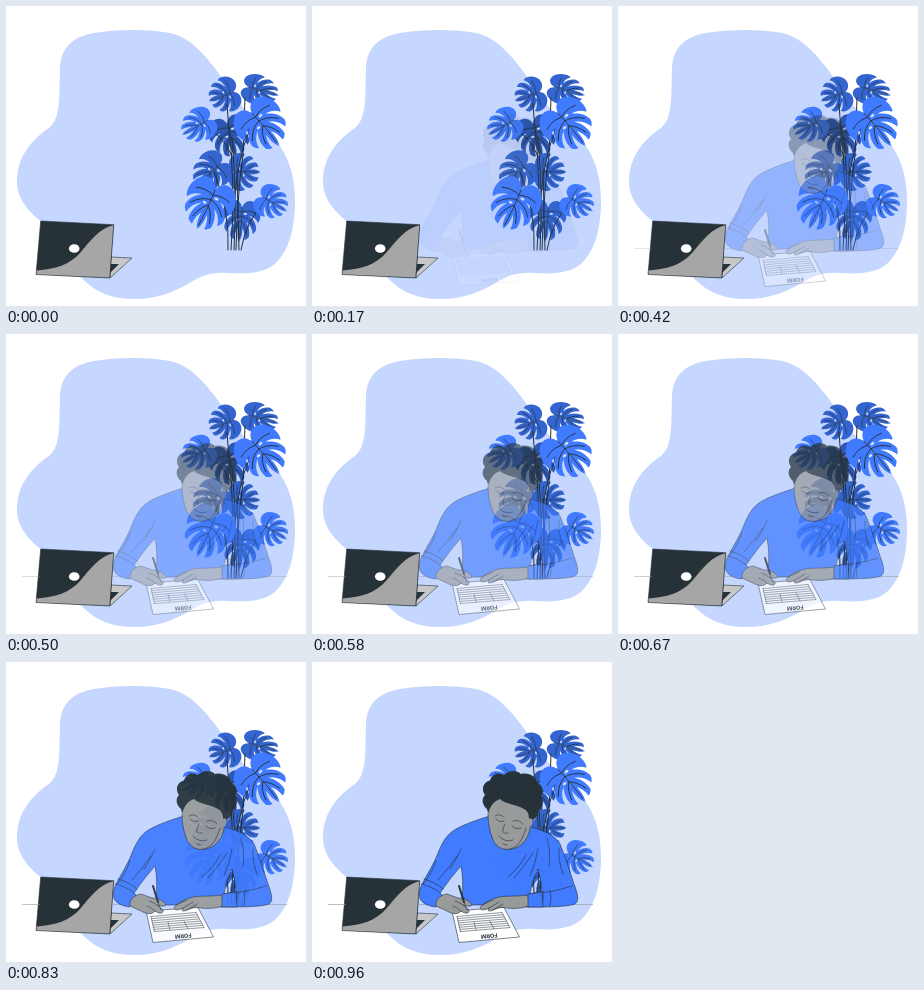
Recreate the animation shown at these times as an HTML page. Size 300 px wide and 300 px high, loop 1000 ms.

```html
<!DOCTYPE html>
<html lang="en">
<head>
<meta charset="utf-8">
<title>Filling in a form</title>
<style>
html, body { margin: 0; width: 100%; height: 100%; overflow: hidden; background: #fff; }
svg { display: block; width: 100vw; height: 100vh; }
.ink { fill: none; stroke: #263238; stroke-width: .6; stroke-linecap: round; stroke-linejoin: round; }
.edge { stroke: #263238; stroke-width: .6; stroke-linejoin: round; }
.skin { fill: #999b9b; }
.shirt { fill: #407bff; }
text { font: 700 5.6px Inter, Arial, sans-serif; fill: #263238; text-anchor: middle; }
</style>
</head>
<body>
<svg viewBox="0 0 300 300">
  <defs>
    <path id="half" d="M0-.55C.05-.85.35-1.05.65-.88C.9-.72 1.02-.4 1-.12C.99 0 .96.06.91.13C.82-.06.62-.18.4-.2C.64-.05.84.18.84.46C.82.57.76.64.68.7C.64.44.5.24.28.12C.46.36.53.6.49.88C.43.97.34 1.02.27 1.03C.28.8.22.6.12.46C.14.72.12.95 0 1.15Z"/>
    <path id="veins" fill="none" stroke="#263238" stroke-width=".035" d="M0-.6Q.05.2 0 1M0-.35Q.35-.5.75-.35M0-.35Q-.35-.5-.75-.35M0-.15Q.4-.1.7.3M0-.15Q-.4-.1-.7.3M0 .1Q.25.3.37.75M0 .1Q-.25.3-.37.75"/>
  </defs>

  <path fill="#c5d6ff" d="M54 62C55 42 66 31 88 27C112 23 143 23 164 27C183 31 197 46 214 69C226 94 245 108 262 126C281 144 289 167 289 194C289 220 284 243 270 257C258 268 240 268 222 267C204 266 196 270 185 276C167 287 149 293 129 293C105 293 88 286 74 270C63 257 52 233 36 216C20 204 10 190 11 173C12 151 25 134 43 122C55 112 53 92 54 62Z"/>

  <g id="back"></g>
  <path class="ink" style="stroke-width:1" d="M222 244Q224 205 208 166M225 244Q230 180 222 112L221 98M228 244Q231 190 226 132M230 244Q232 180 237 150L239 92M233 244Q232 205 231 165M235 244Q240 214 258 198M228 200Q232 145 246 120M226 150Q215 125 196 121"/>
  <g id="front"></g>

  <g id="laptop">
    <path class="edge" fill="#c7c7c7" d="M105 251L126 252L104 272Z"/>
    <path fill="#263238" d="M105 258L113 258L104 267Z"/>
    <path class="edge" fill="#263238" d="M34.700 215L107.800 218.700L103.800 272L30 268.500Z"/>
    <path fill="#a6a6a6" d="M107.300 219.200L103.400 271.600L30.400 268.200L30.600 264.500C50 263 63 259 74 247C85 234 94 222 107.300 219.200Z"/>
    <ellipse cx="68.200" cy="242.500" rx="5.300" ry="4.300" fill="#fff"/>
  </g>

  <g id="person" opacity="0">
    <path d="M16 242.500H34M107 242.500H281" stroke="#8b9499" stroke-width=".6"/>
    <path class="shirt edge" fill-rule="evenodd" d="M178 154C164 158 148 164 141 169C132 175 128 186 124 196C118 209 110 220 107.500 229C106 237 110 243 123 245L136 238L145 243H185L216 245C236 245 255 245 263 242C268 239 265 230 262 222C257 207 253 194 248 182C243 173 231 168 215 164ZM226 207Q220 218 218 232L230 229Q229 217 226 207ZM149 204Q139 215 128 231L132 235L150 238Q152 219 149 204Z"/>
    <path class="ink" d="M145 194Q136 207 126 218M149 187Q143 200 138 207M109 222Q120 224 128 231M112 217Q123 220 131 227M124 199Q118 215 111 222M226 187Q224 201 218 214M221 191Q213 204 202 216M214 193Q207 206 196 215M235 176Q239 190 237 204M218 232Q238 231 260 224M238 228Q240 236 238 244M231 229Q232 237 230 244M247 187Q246 198 251 212"/>

    <path class="skin edge" d="M180 158C178 169 180 182 192 187C205 189 215 181 218 167L216 153Z"/>
    <path fill="#263238" d="M175 147C169 142 170 136 173 133C168 126 173 119 178 119C179 112 187 110 192 113C197 108 205 108 209 112C217 110 224 115 225 120C231 124 232 130 229 134C233 140 230 146 227 148C226 154 222 158 217 160L176 151Z"/>
    <path class="skin" d="M176 152C178 144 182 139 188 137C193 142 203 142 212 147C216 149 217 153 217 157C221 155 222 160 219 164C218 166 216 167 214 166C211 177 206 185 198 187C189 189 182 183 180 175C178 168 176 160 176 152Z"/>
    <path class="ink" d="M176 152C176 163 178 170 180 175C182 183 189 189 198 187C206 185 211 177 214 166M183 154Q187 151 192 155M201 159Q207 157 211 162M184 157Q188 161 192 159M200 164Q204 168 209 166M193 162Q190 168 191 170Q193 172 196 171M187 174Q193 181 201 178M191 182L195 183"/>

    <path class="edge" fill="#fff" d="M140 249L192 245.500L207.500 275L147 280.500Z"/>
    <g class="ink" id="form" style="stroke-width:.5"></g>
    <text transform="translate(177 272) rotate(174)">FORM</text>

    <path class="skin edge" d="M124 244C123 238 128 233 135 232L146 236C153 236 158 239 160 243C158 245 154 244 151 243L157 248C158 252 153 252 149 249C146 253 140 252 135 249Z"/>
    <path class="ink" d="M143 239Q149 241 151 243M141 244Q146 246 149 249"/>
    <path d="M147 224L152 240" stroke="#263238" stroke-width="2" stroke-linecap="round"/>
    <path class="ink" d="M152 240L155 248"/>
    <path class="skin edge" d="M216 233C203 235 191 233 184 236C177 238 170 242 168 246C169 249 173 248 177 246C175 249 177 250 181 248L189 245C198 247 208 247 217 244Z"/>
    <path class="ink" d="M177 246L187 240M181 248L191 242M170 243L181 238"/>
    <path class="shirt edge" d="M216 232L230 230L231 245L216 245Z"/>
  </g>
</svg>
<script>
const $ = id => document.getElementById(id);
const DARK = '#2d57b5', MID = '#3364cf', BRIGHT = '#407bff';

// x, y, half width, half height, turn, colour
const back = [
  [224, 129, 21, 20, -15, DARK],
  [237, 166, 19, 15, -90, MID],
  [235, 213, 19, 20, 5, MID],
  [219, 89, 18, 15, 70, MID],
  [253, 84, 15, 18, -75, MID],
  [206, 165, 19, 19, 50, MID]
];
const front = [
  [193, 119, 17, 17, 60, BRIGHT],
  [255, 118, 25, 25, -40, BRIGHT],
  [203, 197, 25, 25, 25, BRIGHT],
  [265, 196, 17, 16, -60, BRIGHT]
];
const leaf = ([x, y, w, h, turn, fill]) =>
  `<g transform="translate(${x} ${y}) rotate(${turn}) scale(${w} ${h})">
    <g fill="${fill}"><use href="#half"/><use href="#half" transform="scale(-1 1)"/></g>
    <use href="#veins"/>
    <g fill="#d5e1ff"><ellipse cx=".2" cy="-.27" rx=".09" ry=".05"/><ellipse cx="-.17" cy=".05" rx=".08" ry=".05"/></g>
  </g>`;
$('back').innerHTML = back.map(leaf).join('');
$('front').innerHTML = front.map(leaf).join('');

// ruled lines follow the slant of the sheet
let rules = '';
for (let i = 0; i < 8; i++) {
  const y = 253 + i * 2.15, x = 145 + i * .45, end = 190 + i * 1.1;
  rules += `M${x} ${y + 1.5}L${end} ${y - 2.5}`;
}
$('form').innerHTML = `<path d="${rules}M145 254.500L148.500 269.500M190 250.500L198 265.500M162 260L164 268M178 259L182 267"/>`;

// fade in, held at 24 steps a second
const N = 24;
const steps = Array.from({ length: N + 1 }, (_, k) => {
  const t = k / N;
  return { offset: Math.round(t * 100) / 100, opacity: t * t * (3 - 2 * t), easing: 'steps(1, end)' };
});
$('person').animate(steps, { duration: 1000, iterations: Infinity });
</script>
</body>
</html>
```
